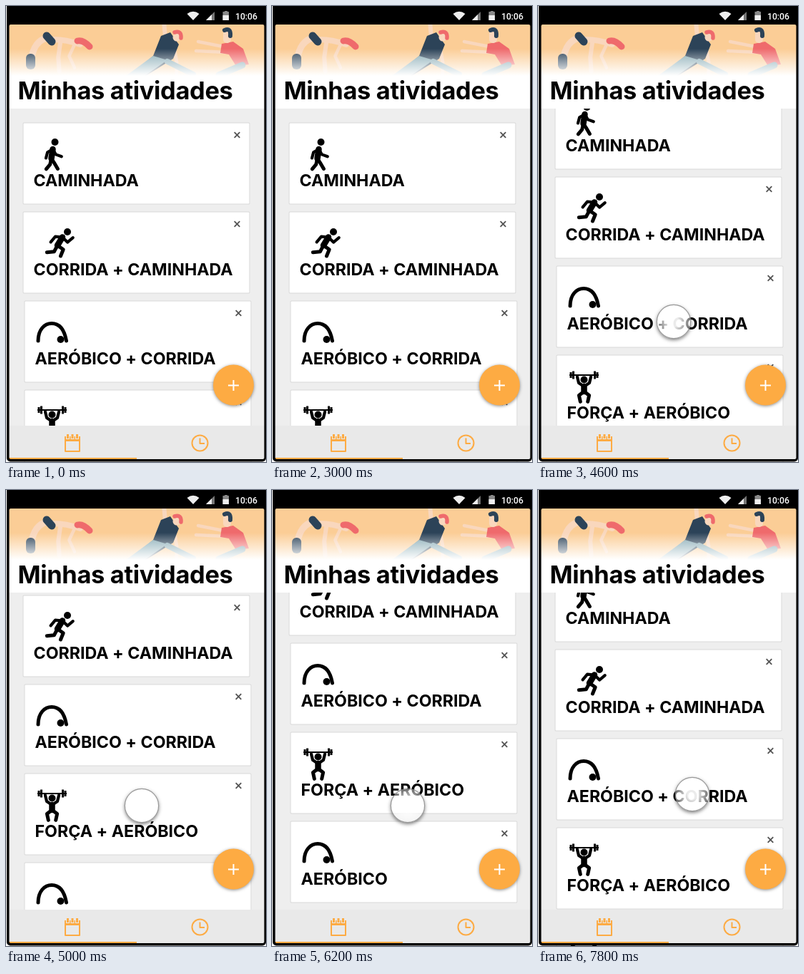
Write an HTML page with a canvas that moves like this. It is 364x640 px and loops after 8 s.

```html
<!DOCTYPE html>
<html lang="pt">
<head>
<meta charset="utf-8">
<title>Minhas atividades</title>
<style>
  html, body { margin: 0; width: 100%; height: 100%; overflow: hidden; background: #fff; }
  canvas { display: block; width: 364px; height: 640px; }
</style>
</head>
<body>
<canvas id="stage"></canvas>
<script>
const W = 364, H = 640, LOOP = 8000, STEP = 200, MAX_SCROLL = 199;
const CARD_TOP = 164, CARD_PITCH = 125;
const ORANGE = '#fdab43', NAVY = '#2c4358', SKIN = '#f9d7bd', RED = '#ef6a6c', TEAL = '#86aab4';
const canvas = document.getElementById('stage');
const ctx = canvas.getContext('2d');
const dpr = window.devicePixelRatio || 1;
canvas.width = W * dpr;
canvas.height = H * dpr;

function rect(x, y, w, h, color) {
  ctx.fillStyle = color;
  ctx.fillRect(x, y, w, h);
}

function round(x, y, w, h, r, color) {
  ctx.fillStyle = color;
  ctx.beginPath();
  ctx.roundRect(x, y, w, h, r);
  ctx.fill();
}

function disc(x, y, r, color = '#000') {
  ctx.fillStyle = color;
  ctx.beginPath();
  ctx.arc(x, y, r, 0, Math.PI * 2);
  ctx.fill();
}

function shape(path, color) {
  ctx.fillStyle = color;
  ctx.fill(new Path2D(path));
}

function stroke(path, width, color = '#000', cap = 'round') {
  ctx.strokeStyle = color;
  ctx.lineWidth = width;
  ctx.lineCap = cap;
  ctx.lineJoin = 'round';
  ctx.stroke(new Path2D(path));
}

// Joined segments of equal length; 0 degrees points down, 90 to the right.
function chain([x, y], length, angles, width, color) {
  let path = `M${x} ${y}`;
  for (const angle of angles) {
    const a = angle * Math.PI / 180;
    x += length * Math.sin(a);
    y += length * Math.cos(a);
    path += `L${x} ${y}`;
  }
  stroke(path, width, color);
}

function text(str, x, y, font, color, spacing = 0) {
  ctx.font = font;
  ctx.letterSpacing = spacing + 'px';
  ctx.fillStyle = color;
  ctx.fillText(str, x, y);
}

function shadow(blur, dy, alpha) {
  ctx.shadowColor = `rgba(0,0,0,${alpha})`;
  ctx.shadowBlur = blur * dpr;
  ctx.shadowOffsetY = dy * dpr;
}

// Icons: x is absolute, y is relative to the card top.
function person({ head, shoulder, hip, limb, arms, legs }) {
  disc(...head, 5);
  stroke(`M${shoulder}L${hip}`, 8.5);
  arms.forEach(pose => chain(shoulder, limb, pose, 4.2));
  legs.forEach(pose => chain(hip, limb, pose, 5));
}

function walker() {
  person({ head: [68.5, 27], shoulder: [65.5, 37], hip: [63.5, 50], limb: 8.5,
    arms: [[30, 70], [-60, -15]], legs: [[33, 30], [-12, -40]] });
}

function runner() {
  person({ head: [86, 28], shoulder: [79, 35.5], hip: [72, 47], limb: 10,
    arms: [[45, 130], [-95, -40]], legs: [[55, -22], [-28, -85]] });
}

function lifter() {
  person({ head: [64.5, 34.5], shoulder: [64.5, 44], hip: [64.5, 51], limb: 9,
    arms: [[-124, -166], [124, 166]], legs: [[-52, 12], [52, -12]] });
  rect(44, 27, 41, 2, '#000');
  for (const side of [-1, 1]) {
    rect(63 + side * 15, 22.5, 3, 11, '#000');
    rect(63 + side * 18.5, 24, 3, 8, '#000');
  }
}

function bridge() {
  stroke('M45 56C45 40 54 31.5 64 31.5C76 31.5 82 42 84.5 56', 5);
  disc(76.5, 54, 5);
}

const cards = [
  ['CAMINHADA', walker],
  ['CORRIDA + CAMINHADA', runner],
  ['AERÓBICO + CORRIDA', bridge],
  ['FORÇA + AERÓBICO', lifter],
  ['AERÓBICO', bridge]
];

function drawCross(x, y, r) {
  stroke(`M${x - r} ${y - r}L${x + r} ${y + r}M${x + r} ${y - r}L${x - r} ${y + r}`, 1.9, '#555', 'butt');
}

function drawCard([label, icon], i, scroll) {
  const x = i < 2 ? 24 : 26;
  ctx.save();
  ctx.translate(0, CARD_TOP + CARD_PITCH * i - scroll);
  round(x - 0.5, -0.5, 318, 115, 1.5, '#d9d9d9');
  round(x + 0.5, 0.5, 316, 113, 1, '#fff');
  icon();
  text(label, x + 14.5, 89, '700 23.2px Inter, sans-serif', '#000');
  drawCross(x + 299.5, 17, 3.8);
  ctx.restore();
}

function drawPeople() {
  // bending pair
  stroke('M35 78Q38 48 60 44', 9, SKIN);
  stroke('M62 47Q82 46 104 54', 8, SKIN);
  chain([76, 52], 20, [-8, 4], 6, SKIN);
  chain([96, 54], 18, [-25, 25], 4.5, SKIN);
  round(28, 67, 13, 22, 6, NAVY);
  stroke('M57 42L64 50', 11, NAVY);
  stroke('M100 49Q108 47 117 57', 9, RED);

  // side stretch
  chain([223, 44], 18, [185], 6, SKIN);
  chain([236, 62], 17, [10, 0], 5, SKIN);
  shape('M217 42L230 37L242 54L234 74L196 98H172L206 70Z', NAVY);
  shape('M206 70L226 76L194 98H168Z', TEAL);
  stroke('M226 78L262 96', 8, TEAL);
  disc(239, 44, 5.5, SKIN);
  stroke('M236 37Q246 34 245 45', 5.5, RED);

  // reaching figure
  stroke('M269 50L304 57M266 63L308 65', 4.5, SKIN);
  shape('M302 53L318 50L332 60L340 82L322 84L312 68L300 66Z', RED);
  stroke('M331 83L298 97', 9, TEAL);
  round(304, 34, 11, 18, 5, SKIN);
  stroke('M306 34Q315 30 314 42', 6, NAVY);
}

function drawHeader() {
  rect(4, 26, 358, 118, '#fbcd96');
  drawPeople();
  const fade = ctx.createLinearGradient(0, 60, 0, 98);
  fade.addColorStop(0, 'rgba(255,255,255,0)');
  fade.addColorStop(1, '#fff');
  rect(4, 60, 358, 84, fade);
  text('Minhas atividades', 16.5, 131, '700 34.4px Inter, sans-serif', '#000', -0.32);
}

function drawStatus() {
  rect(2, 0, 362, 26, '#000');
  shape('M253.5 11Q262 4.5 270.5 11L262 20Z', '#eee');
  shape('M292 8V20H280Z', '#777');
  shape('M288 12V20H280Z', '#eee');
  rect(306, 7, 4, 2, '#888');
  rect(303.5, 8, 8.5, 12, '#888');
  rect(303.5, 13, 8.5, 7, '#eee');
  text('10:06', 321, 18.5, '500 12.2px Roboto, sans-serif', '#fff');
}

function drawNav() {
  rect(4, 589, 358, 48, '#e9e9e9');
  rect(4, 634, 179, 2, ORANGE);
  stroke('M83 605H103V625H83Z', 2, ORANGE);
  rect(82, 604, 22, 7, ORANGE);
  for (let x = 85; x < 100; x += 6.5) {
    rect(x - 1, 602, 5, 6, '#e9e9e9');
    rect(x, 601, 3, 6, ORANGE);
  }
  disc(271.5, 613.5, 12, ORANGE);
  disc(271.5, 613.5, 10, '#e9e9e9');
  stroke('M271.5 606.5V614H278', 2, ORANGE, 'butt');
}

function drawAddButton() {
  ctx.save();
  shadow(4, 1, 0.45);
  disc(318.5, 532, 28.5, ORANGE);
  ctx.restore();
  stroke('M311 532.5H326M318.5 525V540', 2, '#fff', 'butt');
}

function drawTouch(x, y) {
  const r = 24;
  ctx.save();
  // keep the shadow outside the translucent disc
  ctx.beginPath();
  ctx.rect(x - 40, y - 40, 80, 80);
  ctx.arc(x, y, r, 0, Math.PI * 2);
  ctx.clip('evenodd');
  shadow(5, 2, 0.5);
  disc(x, y, r, '#999');
  ctx.restore();
  const glow = ctx.createRadialGradient(x, y, r * 0.3, x, y, r);
  glow.addColorStop(0, 'rgba(255,255,255,0.92)');
  glow.addColorStop(1, 'rgba(255,255,255,0.4)');
  disc(x, y, r, glow);
  ctx.strokeStyle = 'rgba(125,125,125,0.75)';
  ctx.lineWidth = 1.2;
  ctx.beginPath();
  ctx.arc(x, y, r - 0.4, 0, Math.PI * 2);
  ctx.stroke();
}

function drawFrame() {
  ctx.fillStyle = '#000';
  ctx.beginPath();
  ctx.roundRect(1, -10, 363, 649.5, 5);
  ctx.roundRect(4.5, 26, 357, 610, 2);
  ctx.fill('evenodd');
}

function ease(t, start, length) {
  const p = Math.min(1, Math.max(0, (t - start) / length));
  return p * p * (3 - 2 * p);
}

function draw(t) {
  const scroll = Math.round(MAX_SCROLL * (ease(t, 4196, 1250) - ease(t, 6961, 1358)));
  const drift = ease(t, 6500, 500);
  ctx.setTransform(dpr, 0, 0, dpr, 0, 0);
  rect(0, 0, W, H, '#fff');
  rect(4, 26, 358, 611, '#eee');
  cards.forEach((card, i) => drawCard(card, i, scroll));
  drawHeader();
  drawNav();
  drawAddButton();
  if (t >= 3800) drawTouch(190 + 26 * drift, 443 - 16 * drift);
  drawFrame();
  drawStatus();
}

const begin = performance.now();
function tick() {
  const t = (performance.now() - begin) % LOOP;
  draw(Math.floor(t / STEP) * STEP);
  requestAnimationFrame(tick);
}
tick();
</script>
</body>
</html>
```
